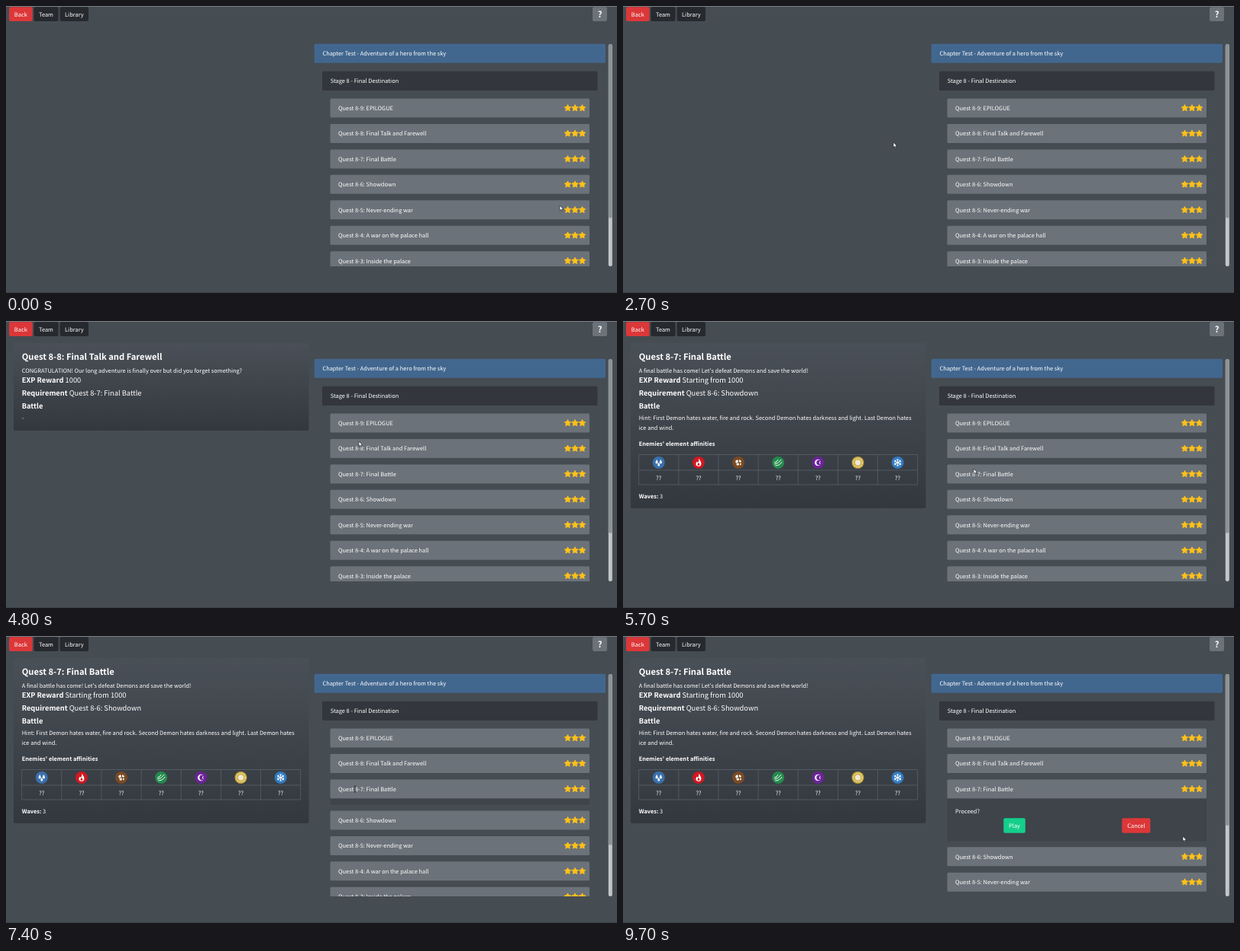
Animation of 800x377 px, one loop 9800 ms. Source, as an HTML page:

```html
<!DOCTYPE html>
<html lang="en">
<head>
<meta charset="utf-8">
<title>Quest list</title>
<style>
  html, body { margin: 0; width: 100%; height: 100%; overflow: hidden; background: #454c52; }
  svg { display: block; width: 800px; height: 377px; }
  text {
    font: 7.45px "Noto Sans CJK JP", "Noto Sans CJK SC", "Noto Sans CJK", sans-serif;
    fill: #fff;
    text-rendering: geometricPrecision;
    white-space: pre;
  }
  .h4 { font-size: 11.18px; font-weight: 700; }
  .h5 { font-size: 9.31px; }
  .b { font-weight: 700; }
  .mid { text-anchor: middle; }
</style>
</head>
<body>
<svg id="stage" viewBox="0 0 800 377"></svg>
<script>
const LOOP = 9800;
const PITCH = 33.45;      // distance between quest rows
const OPEN = 55.4;        // extra height of the confirmation drawer
const FIRST_ROW = 121.5;

const quests = ['9: EPILOGUE', '8: Final Talk and Farewell', '7: Final Battle', '6: Showdown',
  '5: Never-ending war', '4: A war on the palace hall', '3: Inside the palace'];

const box = (x, y, w, h, fill, extra = 'rx="1.5"') =>
  `<rect x="${x}" y="${y}" width="${w}" height="${h}" fill="${fill}" ${extra}/>`;
const label = (x, y, str, cls = '') => `<text x="${x}" y="${y}" class="${cls}">${str}</text>`;
const button = (x, y, w, h, fill, str) =>
  box(x, y, w, h, fill, 'rx="2"') + label(x + w / 2, y + h / 2 + 2.9, str, 'mid');
const pair = (y, name, value) =>
  `<text x="20.7" y="${y}" class="h5"><tspan class="b">${name}</tspan> ${value}</text>`;

function star(cx, cy) {
  const points = Array.from({ length: 10 }, (_, i) => {
    const r = i % 2 ? 2.3 : 4.5, a = i * Math.PI / 5 - Math.PI / 2;
    return `${(cx + r * Math.cos(a)).toFixed(2)},${(cy + r * Math.sin(a)).toFixed(2)}`;
  });
  return `<polygon points="${points.join(' ')}" fill="#ffc118" stroke="#ffc118" stroke-width=".9" stroke-linejoin="round"/>`;
}

const questRow = (name, i) => {
  const y = FIRST_ROW + i * PITCH;
  return box(424.5, y, 339.5, 25, '#6b7279') + label(435, y + 15.3, 'Quest 8-' + name) +
    [735.5, 745, 754.5].map(x => star(x, y + 12.6)).join('');
};

// Element badges: colour and a small glyph centred on 0,0
const line = d => `<path d="${d}" fill="none" stroke="#fff" stroke-width="1"/>`;
const solid = d => `<path d="${d}" fill="#fff"/>`;
const flake = [0, 60, 120].map(a =>
  `<path d="M0-5V5M-1.5-4.3 0-2.8 1.5-4.3M-1.5 4.3 0 2.8 1.5 4.3" transform="rotate(${a})" fill="none" stroke="#fff" stroke-width=".9"/>`).join('');
const elements = [
  ['#3a70ad', solid('M-2.5-4Q-6 1-2.5 1.5Q.5 1-2.5-4M2.5-4Q-.5 1 2.5 1.5Q6 1 2.5-4M0 0Q-3 4 0 4.7Q3 4 0 0')],
  ['#cf1820', solid('M0-5.5Q4-1 3.5 2Q3 5 0 5Q-4 4.5-3.5 1L-2-1.5L-1 0Q1-2 0-5.5')
    + '<path d="M0 0Q3 3 0 4Q-3 3 0 0" fill="#cf1820"/>'],
  ['#7a4a24', solid('M-4-2L-1-4L0-1L-3 1ZM1-4L4-2L3 0L1-1ZM-3 2L0 0L1 3L-1 4ZM2 1L4 1L3 3.5L2 3Z')],
  ['#238a4c', line('M-5 2Q0 2 4-4M-4 4Q2 4 5-1M-5 0Q-2 0 0-4')],
  ['#6c2398', '<circle r="4.3" fill="#fff"/><circle cx="1.5" r="3.5" fill="#6c2398"/>' + line('M3-2Q1 0 3 2')],
  ['#c6a537', '<circle r="5.7" fill="none" stroke="#f4ecc4" stroke-width="1.2" stroke-dasharray="2 1"/><circle r="3.7" fill="#eee7cf"/>'],
  ['#317bc2', flake]
];

function elementTable() {
  const left = 20.7, top = 175.5, colW = 52.14, right = left + 7 * colW;
  let grid = '';
  for (const y of [top, 196, 215]) grid += `M${left} ${y}H${right}`;
  for (let i = 0; i < 8; i++) grid += `M${left + i * colW} ${top}V215`;
  return `<path d="${grid}" fill="none" stroke="#596068" stroke-width=".8"/>` +
    elements.map(([color, glyph], i) => {
      const x = left + (i + .5) * colW;
      return `<g transform="translate(${x} 186)"><circle r="8" fill="${color}"/>${glyph}</g>` +
        label(x, 208.7, '??', 'mid');
    }).join('');
}

const infoPanel = (id, height, title, intro, exp, requirement, rest) =>
  `<g id="${id}">` + box(10, 29, 386.5, height, 'url(#shade)', 'rx="2"') +
  label(20.7, 51.4, title, 'h4') + label(20.7, 67.6, intro) +
  pair(80.8, 'EXP Reward', exp) + pair(97.8, 'Requirement', requirement) +
  label(20.7, 114.5, 'Battle', 'h5 b') + rest + '</g>';

const stage = document.getElementById('stage');
stage.innerHTML = `
  <defs>
    <linearGradient id="shade" x2="0" y2="1">
      <stop stop-color="#4a5057"/><stop offset="1" stop-color="#33383f"/>
    </linearGradient>
    <clipPath id="listArea"><rect x="400" y="45" width="387" height="297"/></clipPath>
    <clipPath id="drawerArea"><rect id="drawerClip" x="424" y="213.4" width="341" height="0"/></clipPath>
  </defs>` +
  box(0, 0, 800, 377, '#454c52', '') + box(0, 0, 800, 1, '#7b8085', '') + box(0, 376, 800, 1, '#3a4046', '') +
  button(4, 1.3, 30.7, 18.7, '#dc3739', 'Back') +
  button(36.5, 1.3, 32, 18.7, '#26292e', 'Team') +
  button(70.7, 1.3, 37.3, 18.7, '#26292e', 'Library') +
  box(768, 1.3, 19, 18.7, '#6b7279', 'rx="2"') + label(777.5, 14.8, '?', 'h4 mid') +
  infoPanel('talkInfo', 115, 'Quest 8-8: Final Talk and Farewell',
    'CONGRATULATION! Our long adventure is finally over but did you forget something?',
    '1000', 'Quest 8-7: Final Battle', label(20.7, 130.3, '-')) +
  infoPanel('battleInfo', 217, 'Quest 8-7: Final Battle',
    "A final battle has come! Let's defeat Demons and save the world!",
    'Starting from 1000', 'Quest 8-6: Showdown',
    label(20.7, 130.3, 'Hint: First Demon hates water, fire and rock. Second Demon hates darkness and light. Last Demon hates') +
    label(20.7, 142.8, 'ice and wind.') +
    label(20.7, 163.6, "Enemies' element affinities", 'b') + elementTable() +
    label(20.7, 232.7, '<tspan class="b">Waves:</tspan> 3')) +
  '<g clip-path="url(#listArea)">' +
  box(403.7, 49.8, 381.3, 25, '#42678f') + label(414.4, 65.1, 'Chapter Test - Adventure of a hero from the sky') +
  box(414, 85.7, 360.5, 25.3, '#33373d') + label(424.7, 101.1, 'Stage 8 - Final Destination') +
  quests.slice(0, 3).map(questRow).join('') +
  '<g clip-path="url(#drawerArea)">' + box(424.5, 213.4, 339.5, 58, '#3e444a', '') +
  '<g id="drawer">' + label(435, 233.3, 'Proceed?') +
  button(498.3, 239.2, 28.5, 19.5, '#14cf8b', 'Play') +
  button(653.3, 239.2, 37.2, 19.5, '#dc3739', 'Cancel') + '</g></g>' +
  '<g id="lowerRows">' + quests.slice(3).map((name, i) => questRow(name, i + 3)).join('') + '</g></g>' +
  box(788.8, 50, 5, 292, '#c3c6c9', 'rx="2.5"') +
  '<rect id="thumb" x="788.8" y="50" width="5" rx="2" fill="#8e9398"/>' +
  '<path id="arrow" d="M0 0V6.6L1.6 5.3L2.7 7.6L3.7 7.1L2.7 4.9H4.7Z" fill="#fff" stroke="#16181b" stroke-width=".6"/>' +
  '<path id="beam" d="M-1.2-4H1.2M0-4V4M-1.2 4H1.2" fill="none" stroke="#22262b" stroke-width=".8"/>';

const el = id => document.getElementById(id);
const show = (id, on) => el(id).setAttribute('visibility', on ? 'visible' : 'hidden');
const move = (id, x, y) => el(id).setAttribute('transform', `translate(${x} ${y})`);

// Pointer stops: time, x, y
const stops = [
  [0, 725, 262], [800, 735, 268], [1250, 784, 300], [1800, 700, 366], [2300, 480, 300],
  [2700, 354, 179], [3400, 358, 177], [4000, 428, 135], [4300, 436, 138], [4800, 462, 158],
  [5300, 462, 168], [5700, 459, 194], [6000, 457, 201], [7800, 457, 201],
  [8500, 530, 245], [9100, 650, 255], [9700, 733, 263], [9800, 731, 263]
];

function pointerAt(t) {
  const next = stops.findIndex(s => s[0] > t);
  const [t0, x0, y0] = stops[next - 1], [t1, x1, y1] = stops[next];
  const p = (t - t0) / (t1 - t0);
  return [x0 + (x1 - x0) * p, y0 + (y1 - y0) * p];
}

// CSS "ease": cubic-bezier(.25, .1, .25, 1), solved by bisection
function ease(x) {
  if (x <= 0) return 0;
  if (x >= 1) return 1;
  const bezier = (a, b, s) => 3 * a * s * (1 - s) ** 2 + 3 * b * s * s * (1 - s) + s ** 3;
  let lo = 0, hi = 1;
  for (let i = 0; i < 20; i++) {
    const s = (lo + hi) / 2;
    if (bezier(.25, .25, s) < x) lo = s; else hi = s;
  }
  return bezier(.1, 1, lo);
}

function draw(now) {
  const t = Math.floor(now % LOOP / 100) * 100;
  const open = ease((t - 7350) / 400);
  const height = OPEN * open;

  show('talkInfo', t >= 4500 && t < 5600);
  show('battleInfo', t >= 5600);
  el('drawerClip').setAttribute('height', height + (open ? .7 : 0));
  move('drawer', 0, Math.max(-.8, height - OPEN));
  move('lowerRows', 0, height);
  el('thumb').setAttribute('height', 228.5 - 29.5 * open);

  const [x, y] = pointerAt(t);
  const overText = t >= 5800 && t <= 7800;
  show('arrow', !overText);
  show('beam', overText);
  move('arrow', x, y);
  move('beam', x, y);
  requestAnimationFrame(draw);
}
requestAnimationFrame(draw);
</script>
</body>
</html>
```
